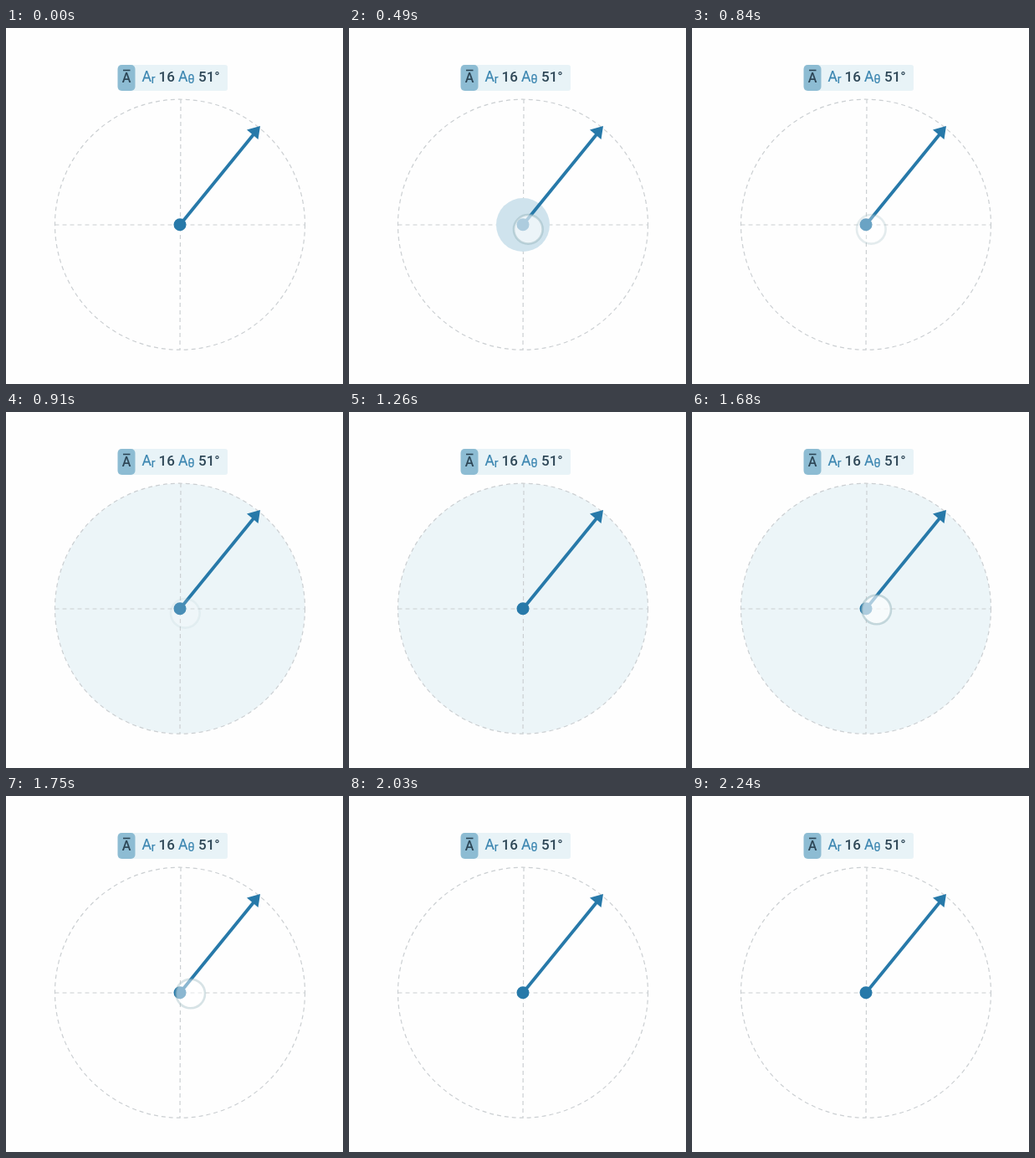
Animation of 403 by 425 pixels, one loop 2.31 s. Source, as an HTML page:

```html
<!DOCTYPE html>
<html lang="en">
<head>
<meta charset="utf-8">
<title>Polar vector</title>
<style>
  html, body { margin: 0; width: 100%; height: 100%; overflow: hidden; background: #fefefe; }
  svg { display: block; }
  text { font: 500 17px Roboto, sans-serif; fill: #2d4656; }
  .blue { font-weight: 400; font-size: 17.5px; fill: #3a85b0; stroke: #3a85b0; stroke-width: .2; }
  .sub { font-size: 14px; }
  .guides { fill: none; stroke: #cbcfd2; stroke-width: 1.2; stroke-dasharray: 5 4; }
</style>
</head>
<body>
<svg width="403" height="425" viewBox="0 0 403 425">
  <rect x="134" y="44" width="131" height="31" rx="3" fill="#e8f3f7"/>
  <rect x="133.5" y="44" width="21" height="31" rx="5" fill="#8dbcd3"/>
  <path d="M140 50.5h8.500" stroke="#2d4656" stroke-width="1.600"/>
  <text x="144.200" y="64.500" text-anchor="middle" style="font-size:16px">A</text>
  <text class="blue" x="162.500" y="64.200">A</text>
  <text class="blue sub" x="173.800" y="66">r</text>
  <text x="182.500" y="64.200">16</text>
  <text class="blue" x="206" y="64.200">A</text>
  <text class="blue sub" x="217.500" y="66">θ</text>
  <text x="230" y="64.200">51°</text>

  <circle id="disk" cx="208" cy="234.700" r="149.500" fill="#ecf5f8"/>
  <g class="guides">
    <circle cx="208" cy="234.700" r="149.500"/>
    <path d="M58.500 235H357.500M209 85L208 384"/>
  </g>
  <circle id="halo" cx="208" cy="235" r="32" fill="#cfe3ed"/>
  <g fill="#2779a9">
    <path d="M208 235L296.500 126.500" stroke="#2779a9" stroke-width="3.800"/>
    <path d="M304 117L301.500 133L288 121.500Z"/>
    <circle cx="208" cy="234.700" r="7.500"/>
  </g>
  <circle id="touch" r="17.300" fill="#fff" fill-opacity=".62" stroke="#96b5bd" stroke-opacity=".5" stroke-width="2.600"/>
</svg>
<script>
const LOOP = 2310, STEP = 70, FADE = 280;
const [disk, halo, touch] = ['disk', 'halo', 'touch'].map(id => document.getElementById(id));
const taps = [
  { down: 350, up: 700, x: 214.3, y: 240.3 },
  { down: 1540, up: 1680, x: 220.7, y: 236 }
];

const clamp = v => Math.max(0, Math.min(1, v));
const show = (el, on) => el.setAttribute('opacity', on ? 1 : 0);

function draw(now) {
  const t = Math.floor(now % LOOP / STEP) * STEP;
  const tap = t < 1400 ? taps[0] : taps[1];
  const fadeIn = clamp((t - tap.down + STEP) / 140);
  const fadeOut = clamp(1 - (t - tap.up) / FADE);
  touch.setAttribute('cx', tap.x);
  touch.setAttribute('cy', tap.y);
  touch.setAttribute('opacity', Math.min(fadeIn, fadeOut));
  show(halo, t >= 420 && t < 700);
  show(disk, t >= 910 && t < 1750);
}

const start = performance.now();
function tick() {
  draw(performance.now() - start);
  requestAnimationFrame(tick);
}
tick();
</script>
</body>
</html>
```
